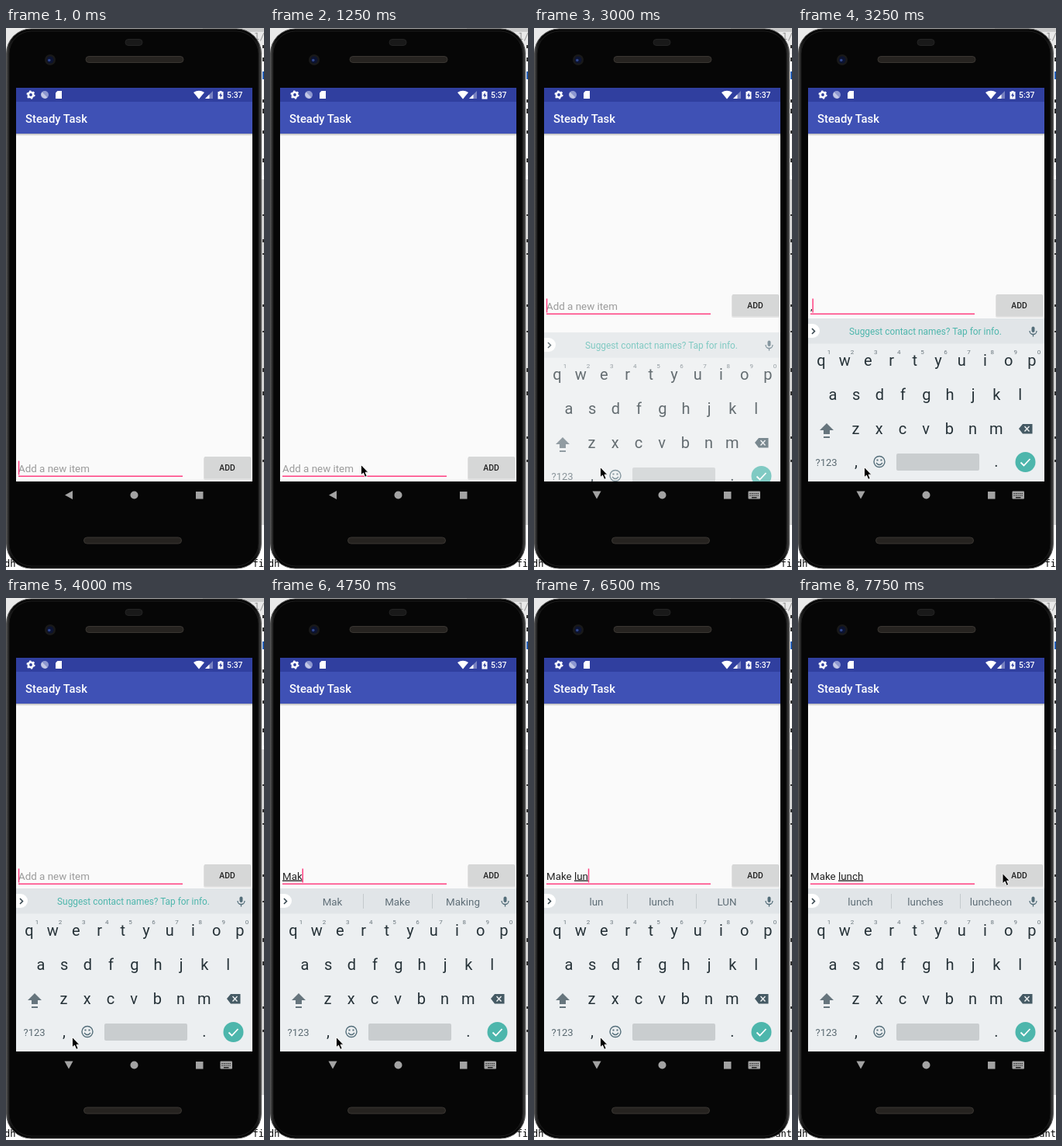
Write an HTML page that moves like this. It is 333 px wide and 698 px high and loops after 8 s.

```html
<!DOCTYPE html>
<html lang="en">
<head>
<meta charset="utf-8">
<title>Todo demo</title>
<style>
html, body { margin: 0; width: 100%; height: 100%; overflow: hidden; background: #fff; }
svg { display: block; width: 333px; height: 698px; font-family: Roboto, sans-serif; }
text { white-space: pre; }
.mid { text-anchor: middle; }
.mono { font: 12px "DejaVu Sans Mono", monospace; }
.field { font-size: 13.36px; }
.key { font-size: 20px; fill: #263238; }
.num { font-size: 8px; fill: #6b777e; }
.sug { font-size: 13.36px; fill: #5f6e77; }
.tip { font-size: 11.87px; fill: #4db6ac; }
</style>
</head>
<body>
<svg viewBox="0 0 333 698">
  <defs>
    <linearGradient id="rim">
      <stop offset="0" stop-color="#4c4c4c"/><stop offset=".012" stop-color="#1c1c1c"/>
      <stop offset=".03" stop-color="#050505"/><stop offset=".97" stop-color="#050505"/>
      <stop offset=".988" stop-color="#1c1c1c"/><stop offset="1" stop-color="#4c4c4c"/>
    </linearGradient>
    <linearGradient id="shade" x2="0" y2="1">
      <stop offset="0" stop-color="#000" stop-opacity=".28"/><stop offset="1" stop-color="#000" stop-opacity="0"/>
    </linearGradient>
    <clipPath id="screen"><path d="M13 77H318V584H13Z"/></clipPath>
  </defs>

  <!-- desktop behind the phone -->
  <path fill="#e9e9e9" d="M0 0H333V34H0Z"/>
  <path fill="#c9c9c9" d="M254 0H333V5H254Z"/>
  <path fill="#f4f4f4" d="M0 34H333V190H0Z"/>
  <path fill="#d2d2d2" d="M0 190H4V640H0ZM328 195H333V640H328Z"/>
  <text class="mono" x="320" y="15" fill="#999">1/</text>
  <g id="specks" fill="#333"></g>
  <path fill="#2962b8" d="M331 56H333V66H331Z"/>
  <text class="mono" x="-2" y="694">dh</text>
  <text class="mono" id="behind" x="333" y="694" text-anchor="end"></text>

  <!-- phone body -->
  <rect x=".5" y="1" width="329" height="695" rx="32" fill="url(#rim)" stroke="#555"/>
  <rect x="4" y="4" width="322" height="689" rx="29" fill="#060606" stroke="#1d1d1d"/>
  <rect x="154" y="14.500" width="22" height="8" rx="4" fill="#191919" stroke="#242424"/>
  <g fill="#262320" stroke="#3a3632">
    <rect x="103" y="36.500" width="126" height="8" rx="4"/>
    <rect x="100.500" y="656" width="126" height="8" rx="4"/>
  </g>
  <circle cx="57" cy="41" r="7" fill="#191919"/>
  <circle cx="57" cy="41" r="4.500" fill="#0c1330"/>
  <circle cx="55.800" cy="41.500" r="1.800" fill="#31478c"/>

  <g clip-path="url(#screen)">
    <path fill="#fafafa" d="M13 77H318V584H13Z"/>
    <path fill="#303f9f" d="M13 77H318V95.500H13Z"/>
    <path fill="#3f51b5" d="M13 95H318V136H13Z"/>
    <path fill="url(#shade)" d="M13 136H318V139H13Z"/>
    <text x="25" y="121.500" fill="#fff" font-size="14.84" font-weight="500">Steady Task</text>

    <!-- status bar -->
    <g fill="#fff">
      <circle cx="32" cy="86" r="3.200" fill="none" stroke="#fff" stroke-width="2.600"/>
      <circle cx="32" cy="86" r="4.900" fill="none" stroke="#fff" stroke-width="1.400" stroke-dasharray="2.300 2.830"/>
      <circle cx="50" cy="86" r="5" fill="#8d97cf"/>
      <path fill="#c3c8e6" d="M46.500 82.500A5 5 0 0 0 53.500 89.500Z"/>
      <path d="M66.500 81H72V91H64V83.500Z"/>
      <path d="M242 83Q249 78.500 256 83L249 91.500Z"/>
      <path opacity=".35" d="M267 81V91H257Z"/>
      <path d="M262.500 85.500V91H257Z"/>
      <path d="M273.500 82H275.500V81H278.500V82H280.500V91.500H273.500Z"/>
      <path fill="#303f9f" d="M277.600 83 275 87.300H276.700V90.300L279.200 86H277.600Z"/>
      <text x="285" y="90" font-size="10.4" font-weight="500">5:37</text>
    </g>

    <!-- input row -->
    <g id="row">
      <text class="field" id="hint" x="16" y="571.500" fill="#9b9b9b">Add a new item</text>
      <text class="field" id="typed" x="16" y="571.500" fill="#212121"><tspan id="done"></tspan><tspan id="word" text-decoration="underline"></tspan></text>
      <path fill="#ff4081" d="M16 576.600H228V578.100H16Z"/>
      <path id="caret" fill="#ff4081" d="M-.2 557.500H1.300V575.500H-.2Z"/>
      <rect x="255" y="553" width="62" height="29" rx="2" fill="#000" opacity=".09"/>
      <rect x="255.700" y="552" width="60.300" height="28.300" rx="1.500" fill="#d6d7d7"/>
      <text class="mid" x="285.500" y="570" font-size="10.4" font-weight="500" fill="#212121">ADD</text>
    </g>

    <!-- keyboard -->
    <g id="board">
      <path fill="#eceff1" d="M13 374H318V584H13Z"/>
      <path fill="#e1e5e8" d="M13 374H318V406.500H13Z"/>
      <path fill="#fff" d="M13 381H19A9 9 0 0 1 19 399H13Z"/>
      <path fill="none" stroke="#37474f" stroke-width="1.600" d="M18 387 21.500 390.500 18 394"/>
      <text class="tip mid" id="tip" x="164.500" y="395">Suggest contact names? Tap for info.</text>
      <g id="sugs">
        <path stroke="#c3c9cc" d="M120.500 381V400M209.500 381V400"/>
        <text class="sug mid" x="80.500" y="395.500"></text>
        <text class="sug mid" x="164.500" y="395.500"></text>
        <text class="sug mid" x="249" y="395.500"></text>
      </g>
      <g fill="none" stroke="#546e7a" stroke-width="1.300">
        <path stroke-width="4" stroke-linecap="round" d="M303.500 386.500V390"/>
        <path d="M299 390A4.500 4.500 0 0 0 308 390M303.500 394.500V397.500"/>
      </g>
      <g id="keys"></g>
      <path fill="#66757d" d="M37 509 46 518H41V523H33V518H28ZM33 526H41V528H33Z"/>
      <path fill="#455a64" d="M285 516 290 510H302.500V522.500H290Z"/>
      <path stroke="#eceff1" stroke-width="1.400" d="M292.500 513 298.500 519.500M298.500 513 292.500 519.500"/>
      <text x="22.500" y="563.500" font-size="13" fill="#5b6a72">?123</text>
      <g fill="none" stroke="#546e7a" stroke-width="1.400">
        <circle cx="105" cy="558.500" r="7"/>
        <path d="M101 560Q105 565 109 560"/>
        <path stroke-width="2" d="M101.500 556.500H103.500M106.500 556.500H108.500"/>
      </g>
      <rect x="127" y="548" width="107" height="22" rx="2" fill="#c9cdcf"/>
      <circle cx="293.500" cy="559" r="13" fill="#4db6ac"/>
      <path fill="none" stroke="#fff" stroke-width="1.800" d="M287.500 559.500 291.500 563.500 299.500 555"/>
    </g>
  </g>

  <!-- navigation bar -->
  <g fill="#a3a3a3">
    <path id="back" d="M76 601.500 86 596V607Z"/>
    <circle cx="165.500" cy="601.500" r="5"/>
    <path d="M245 597H254.500V606.500H245Z"/>
    <g id="ime">
      <rect x="276.500" y="596.500" width="15.500" height="10" rx="1"/>
      <path stroke="#060606" stroke-width="1.200" stroke-dasharray="1.200 1.300" d="M278.500 599.500H290.500M278.500 602H290.500"/>
      <path stroke="#060606" stroke-width="1.200" d="M281 604.700H287.500"/>
    </g>
  </g>

  <path id="mouse" stroke="#fff" stroke-width=".9" d="M0 0V13.200L3 10.500 5.200 15.800 7.700 14.800 5.500 9.700H9.300Z"/>
</svg>
<script>
const LOOP = 8000;
const $ = id => document.getElementById(id);
const sugs = [...$('sugs').querySelectorAll('text')];

function svgText(cls, x, y, str) {
  const t = document.createElementNS('http://www.w3.org/2000/svg', 'text');
  t.setAttribute('class', cls + ' mid');
  t.setAttribute('x', x);
  t.setAttribute('y', y);
  t.textContent = str;
  $('keys').append(t);
}

[['qwertyuiop', 30, 435], ['asdfghjkl', 45, 479], ['zxcvbnm', 74.5, 523]].forEach(([row, x, y]) =>
  [...row].forEach((c, i) => svgText('key', x + i * 30.2, y, c)));
[...'1234567890'].forEach((c, i) => svgText('num', 40 + i * 30.1, 420, c));
svgText('key', 75, 565, ',');
svgText('key', 256, 565, '.');

// dark crumbs of code showing past the phone's right edge
for (const y of [22, 38, 92, 104, 132, 168, 240, 272, 290, 356, 390, 438, 468, 526, 556]) {
  const r = document.createElementNS('http://www.w3.org/2000/svg', 'rect');
  Object.entries({ x: 331, y, width: 2, height: 2 + y % 5 }).forEach(a => r.setAttribute(...a));
  $('specks').append(r);
}

// Each step changes some fields and keeps the rest.
const steps = [
  [0, { board: 0, done: '', word: '', sug: '', caret: 1, mouse: null, behind: 'fi' }],
  [250, { caret: 0 }],
  [500, { mouse: [156, 601] }],
  [750, { caret: 1, mouse: null }],
  [1000, { mouse: [117.5, 562.5] }],
  [1250, { caret: 0 }],
  [1750, { caret: 1 }],
  [2250, { caret: 0 }],
  [2750, { caret: 1, mouse: [85.5, 565.5] }],
  [3000, { board: .7 }],
  [3250, { board: 1, done: ',' }],
  [3500, { caret: 0 }],
  [4000, { caret: 1, done: '' }],
  [4500, { word: 'M', sug: 'M My Me' }],
  [4750, { word: 'Mak', sug: 'Mak Make Making' }],
  [5000, { done: 'Make ', word: '', sug: 'sure it the' }],
  [5250, { word: 'li', sug: 'li like life' }],
  [5750, { word: 'lin', sug: 'lin line link' }],
  [6000, { word: '', sug: 'sure it the', behind: 'ant' }],
  [6500, { word: 'lun', sug: 'lun lunch LUN' }],
  [6750, { word: 'lunch', sug: 'lunch lunches luncheon' }],
  [7250, { mouse: [97, 553.5] }],
  [7500, { caret: 0, mouse: [269, 386] }],
  [7750, { mouse: [264, 354.5] }]
];
let last = {};
const states = steps.map(([at, change]) => (last = { ...last, ...change, at }));

const show = (el, on) => el.setAttribute('visibility', on ? 'visible' : 'hidden');
const move = (el, x, y) => el.setAttribute('transform', `translate(${x} ${y})`);

function draw(s) {
  const up = s.board > 0;
  $('done').textContent = s.done;
  $('word').textContent = s.word;
  show($('hint'), !s.done && !s.word);
  const width = s.done || s.word ? $('typed').getComputedTextLength() : 0;
  move($('caret'), 16 + width, 0);
  show($('caret'), s.caret);
  move($('row'), 0, up ? -209 : 0);

  show($('board'), up);
  $('board').setAttribute('opacity', s.board);
  move($('board'), 0, (1 - s.board) * 60);
  $('tip').setAttribute('opacity', s.sug ? 0 : 1);
  $('sugs').setAttribute('opacity', s.sug ? 1 : 0);
  const words = s.sug.split(' ');
  sugs.forEach((t, i) => t.textContent = words[i] || '');

  $('back').setAttribute('transform', up ? 'rotate(-90 81 601.5)' : '');
  show($('ime'), up);
  $('behind').textContent = s.behind;
  show($('mouse'), s.mouse);
  if (s.mouse) move($('mouse'), ...s.mouse);
}

let current;
function tick() {
  const t = performance.now() % LOOP;
  const s = states.findLast(s => s.at <= t);
  if (s !== current) draw(current = s);
  requestAnimationFrame(tick);
}
tick();
</script>
</body>
</html>
```
